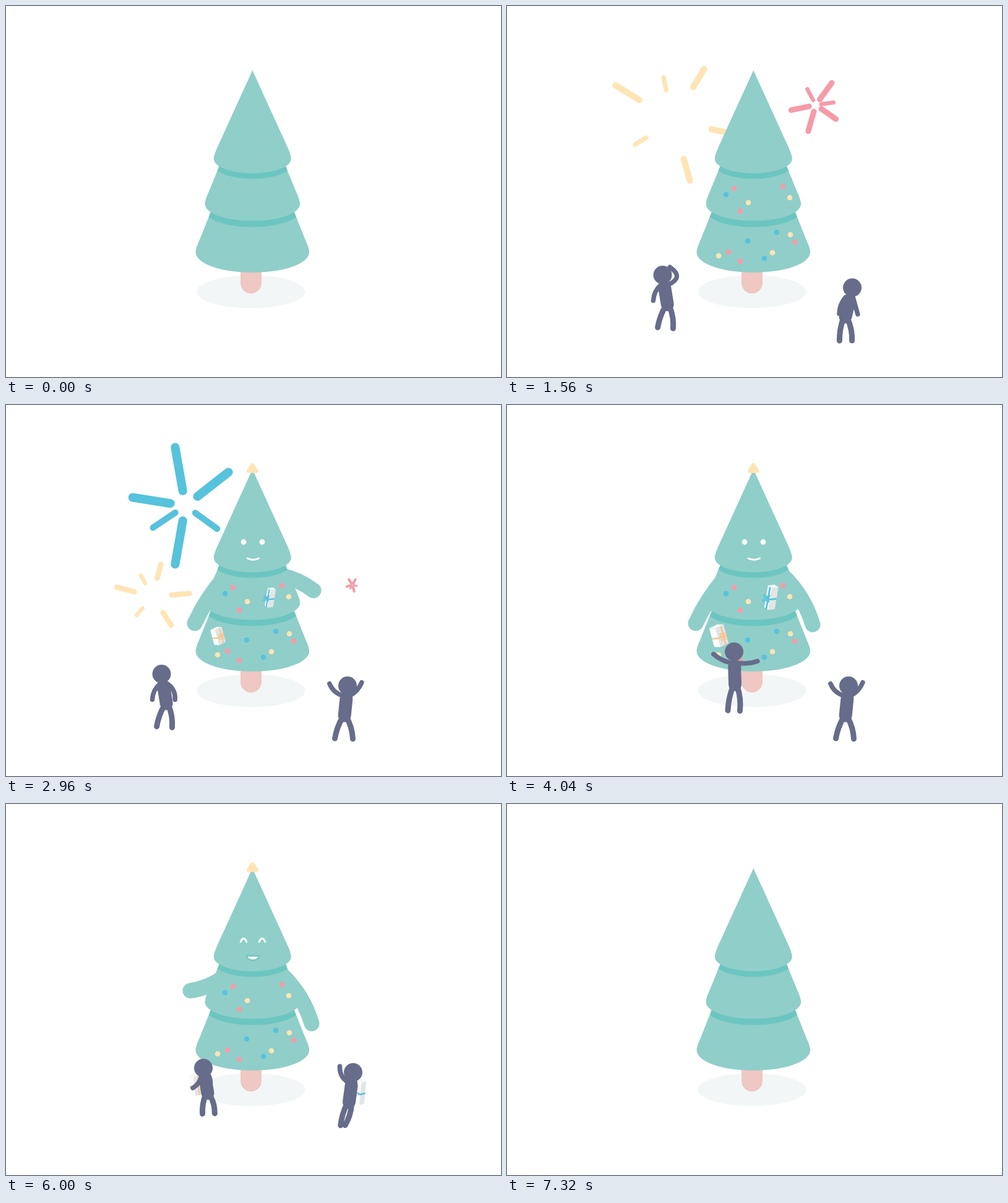
Recreate the animation shown at these times as an HTML page with a canvas. Size 800 by 600 pixels, loop 8.52 s.

```html
<!DOCTYPE html>
<html lang="en">
<head>
<meta charset="utf-8">
<title>Festive tree</title>
<style>
html, body { margin: 0; width: 100%; height: 100%; overflow: hidden; background: #fff; }
canvas { display: block; width: 800px; height: 600px; }
</style>
</head>
<body>
<canvas id="stage" width="800" height="600"></canvas>
<script>
const c = document.getElementById('stage').getContext('2d');
const LOOP = 8520, STEP = 40, CX = 398.3;
const LEAF = '#90cec9', BAND = '#6cc5c0', BODY = '#666c8a';
const PINK = '#f59ba8', YELLOW = '#ffe4b5', BLUE = '#57c2dc', ORANGE = '#f3c794';

const clamp = v => Math.max(0, Math.min(1, v));
const span = (t, a, b) => clamp((t - a) / (b - a));
const smooth = p => p * p * (3 - 2 * p);
const ease = (t, a, b) => smooth(span(t, a, b));
const outCubic = p => 1 - (1 - p) ** 3;
const lerp = (a, b, p) => a + (b - a) * p;
const mix = (a, b, p) => a.map((v, i) => lerp(v, b[i], p));
const swell = p => p <= 0 ? 0 : 1 + 2.2 * (p - 1) ** 3 + 1.2 * (p - 1) ** 2;
const shown = (t, inAt, outAt) => swell(span(t, inAt, inAt + 260)) * (1 - ease(t, outAt, outAt + 260));

function disc(x, y, r, color) {
  c.fillStyle = color;
  c.beginPath();
  c.arc(x, y, Math.max(0, r), 0, 7);
  c.fill();
}

// A stroke between two points, bowed sideways by `bend`.
function bow(color, width, x1, y1, x2, y2, bend = 0) {
  const dx = x2 - x1, dy = y2 - y1, k = bend / (Math.hypot(dx, dy) || 1);
  c.strokeStyle = color;
  c.lineWidth = width;
  c.beginPath();
  c.moveTo(x1, y1);
  c.quadraticCurveTo((x1 + x2) / 2 + dy * k, (y1 + y2) / 2 - dx * k, x2, y2);
  c.stroke();
}

function shape(color, ...pts) {
  c.fillStyle = color;
  c.beginPath();
  pts.forEach(([x, y]) => c.lineTo(x, y));
  c.closePath();
  c.fill();
}

function at(x, y, scale, paint) {
  if (scale <= 0) return;
  c.save();
  c.translate(x, y);
  c.scale(scale, scale);
  paint();
  c.restore();
}

// ---- fireworks ----
const RAYS = [[0, 1], [46, .66], [89, .9], [160, 1], [222, .92], [296, .66]];
const LIFE = 576;
const BURSTS = [
  { start: 1186, x: 268, y: 186, size: 114, turn: -148, color: YELLOW },
  { start: 1480, x: 499, y: 160, size: 122, turn: -54, color: PINK },
  { start: 2620, x: 237, y: 310, size: 64, turn: -165, color: YELLOW },
  { start: 2758, x: 290, y: 163, size: 132, turn: 100, color: BLUE },
  { start: 2914, x: 560, y: 291, size: 48, turn: 76, color: PINK }
];

function burst(t, { start, x, y, size, turn, color }) {
  const p = (t - start) / LIFE;
  if (p <= 0 || p >= 1) return;
  const out = outCubic(p);
  const inner = Math.max(.25 * out, p ** 2.15 * (2.2 - 1.2 * p));
  const width = (6 + size * .063) * Math.sin(Math.PI * p ** .75);
  for (const [deg, len] of RAYS) {
    const a = (deg + turn) * Math.PI / 180, thin = len < .8;
    const r1 = size * inner * (thin ? .8 : 1), r2 = size * out * len;
    const dx = Math.cos(a), dy = Math.sin(a);
    bow(color, width * (thin ? .72 : 1), x + dx * r1, y + dy * r1, x + dx * r2, y + dy * r2);
  }
}

// ---- tree ----
function tier(topHalf, topY, half, y, base) {
  const p = new Path2D(), k = lerp(y, base, .57);
  p.moveTo(CX - topHalf, topY);
  p.lineTo(CX - half + 6, y - 19);
  p.quadraticCurveTo(CX - half, y - 6, CX - half, y);
  p.bezierCurveTo(CX - half, k, CX - half * .55, base, CX, base);
  p.bezierCurveTo(CX + half * .55, base, CX + half, k, CX + half, y);
  p.quadraticCurveTo(CX + half, y - 6, CX + half - 6, y - 19);
  p.lineTo(CX + topHalf, topY);
  p.closePath();
  return p;
}
const TOP = tier(0, 104, 62.5, 247, 270.5);
const MIDDLE = tier(52, 255, 76.8, 320, 347.5);
const BOTTOM = tier(67, 332, 91.8, 398, 431);

function layer(path, above, drop) {
  c.fillStyle = LEAF;
  c.fill(path);
  if (!above) return;
  c.save();
  c.clip(path);
  c.translate(0, drop);
  c.fillStyle = BAND;
  c.fill(above);
  c.restore();
}

function arms(t) {
  if (t < 2100 || t > 7040) return;
  const out = ease(t, 2100, 2520) * (1 - ease(t, 6700, 7040));
  const wave = (a, b) => t > a && t < b ? (1 - Math.cos((t - a) * Math.PI / 200)) / 2 : 0;

  const lift = ease(t, 5320, 5600), drop = ease(t, 3760, 4000);
  let left = mix([305, 353], [298, 302], lift);
  left = mix(left, [284, 249], wave(5600, 6800));
  bow(LEAF, 25, 352, 280, ...mix([352, 285], left, out), lerp(-6, 7, lift) * out);

  let right = mix([497, 300], [513, 282], wave(2560, 3760));
  right = mix(right, [494, 355], drop);
  bow(LEAF, 25, 446, 276, ...mix([446, 285], right, out), lerp(6, 12, drop) * out);
}

const DOTS = {
  [PINK]: [[367, 295], [446, 292], [377, 332], [358, 398], [465, 382], [377, 413]],
  [BLUE]: [[354, 305], [389, 380], [436, 366], [416, 408]],
  [YELLOW]: [[390, 318], [457, 310], [458, 370], [429, 399], [342, 404]]
};

function dots(t) {
  let n = 0;
  for (const color in DOTS) {
    for (const [x, y] of DOTS[color]) {
      disc(x, y, 4.3 * shown(t, 960 + n++ * 7 % 15 * 22, 7060), color);
    }
  }
}

function star() {
  c.strokeStyle = YELLOW;
  c.lineWidth = 6;
  shape(YELLOW, [0, -13], [6.5, -3], [-6.5, -3]);
  c.stroke();
}

function face(happy) {
  for (const x of [-15, 15]) {
    if (happy) bow('#fff', 2.8, x - 5, -13, x + 5, -13, 11);
    else disc(x, -14.5, 4.4, '#fff');
  }
  if (!happy) return bow('#fff', 3, -9, 12, 9.5, 12, -4.5);
  c.fillStyle = '#fff';
  c.strokeStyle = BAND;
  c.lineWidth = 2.4;
  c.beginPath();
  c.moveTo(-10.5, 9.5);
  c.lineTo(10.5, 9.5);
  c.bezierCurveTo(8, 19, -8, 19, -10.5, 9.5);
  c.closePath();
  c.fill();
  c.stroke();
}

function tree(t) {
  c.fillStyle = '#f2f6f7';
  c.beginPath();
  c.ellipse(396, 462, 87.5, 26.5, 0, 0, 7);
  c.fill();
  bow('#efc7c3', 34, 396, 420, 396, 448);
  arms(t);
  layer(BOTTOM, MIDDLE, 10);
  layer(MIDDLE, TOP, 9);
  layer(TOP);
  dots(t);
  at(CX, 110, shown(t, 1880, 6980), star);
  at(399, 236, shown(t, 2040, 6840), () => face(t >= 4400));
}

// ---- people ----
// head x, y, size, lean, then angle and bend of each arm, angle of each leg (0 hangs down)
const POSES = {
  stand: [251.5, 435, 1, .16, -.45, -6, .45, 8, -.34, .15],
  scratch: [251.5, 435, 1, .16, -.45, -6, 3.06, -25, -.34, .15],
  reach: [367, 399, 1.1, .03, -2.04, 4, 1.66, -4, -.2, .1],
  bend: [401, 436, .8, -.8, .5, -4, .92, 6, 0, -.25],
  carry: [319, 427, .85, .17, -.62, 5, 0, 5, -.15, .25],
  shrug: [558, 455.5, 1, -.23, -.37, -5, .27, 0, -.16, .19],
  cheer: [552, 454, 1, -.1, -2.31, 7, 2.41, -5, -.34, .27],
  look: [509, 450, 1, -.06, -.87, 5, -.1, 14, -.4, .2],
  wave: [561, 434, 1, -.135, -2.68, 8, -.15, 0, -.28, -.3]
};
// time, pose, sideways shift, strides taken to get there
const LEFT = [
  [240, 'stand', -142], [1260, 'stand', 0, 3], [1520, 'scratch'], [1800, 'scratch'], [1960, 'stand'],
  [3340, 'stand'], [4030, 'reach', 0, 2], [4400, 'reach'], [4880, 'bend'], [5040, 'bend'],
  [5300, 'carry', 56], [6000, 'carry', 0, 2], [7040, 'carry', -207, 4]
];
const RIGHT = [
  [520, 'shrug', 132], [1480, 'shrug', 0, 3], [1800, 'shrug'], [1960, 'cheer'], [4440, 'cheer'],
  [4920, 'look', 0, 2], [5300, 'look', -44, 2], [5420, 'look', -44], [6000, 'wave', 0, 2],
  [6760, 'wave', 132, 3]
];

function poseAt(t, keys) {
  const i = keys.findIndex(k => k[0] > t);
  if (i < 1) return null;
  const place = ([, name, dx = 0]) => {
    const [x, y, ...rest] = POSES[name];
    return [x + dx, y + Math.abs(dx) * .17, ...rest];
  };
  const a = keys[i - 1], b = keys[i], strides = b[3] || 0;
  const p = span(t, a[0], b[0]);
  const pose = mix(place(a), place(b), strides ? p : smooth(p));
  const swing = Math.sin(2 * Math.PI * strides * p);
  pose[4] -= .12 * swing;
  pose[6] += .12 * swing;
  pose[8] += .35 * swing;
  pose[9] -= .35 * swing;
  return pose;
}

function person(pose) {
  if (!pose) return;
  const [x, y, size, lean, armL, bendL, armR, bendR, legL, legR] = pose;
  const along = (x, y, a, len) => [x + Math.sin(a) * len * size, y + Math.cos(a) * len * size];
  const limb = (x, y, a, len, bend, w) => bow(BODY, w, x, y, ...along(x, y, a, len), bend);
  const [nx, ny] = along(x, y, lean, 21), [hx, hy] = along(x, y, lean, 48.5);
  disc(x, y, 15, BODY);
  bow(BODY, 21, nx, ny, hx, hy);
  limb(nx - 6, ny - 5, armL, 28.5, bendL, 7.5);
  limb(nx + 6, ny - 5, armR, 28.5, bendR, 7.5);
  limb(hx - 4, hy + 4, legL, 35, -3, 9);
  limb(hx + 4, hy + 4, legR, 35, 4, 9);
}

// ---- presents ----
const GIFTS = [
  { color: ORANGE, wl: 10, wr: 14, h: 31, knot: 7, hang: [343, 375], tilt: -.26, floor: [356, 480], hold: [-13, 29], lift: 5040 },
  { color: BLUE, wl: 7, wr: 10, h: 36, knot: -8, hang: [427, 313], tilt: .17, floor: [440, 486], hold: [13, 34], lift: 5240 }
];

function gift(t, { color, wl, wr, h, knot, hang, tilt, floor, hold, lift }, owner) {
  if (t < 2720 || !owner) return;
  const fall = span(t, 4240, 4560) ** 2, held = ease(t, lift, lift + 200);
  const [x, y] = mix(mix(hang, floor, fall), [owner[0] + hold[0], owner[1] + hold[1]], held);
  at(x, y, outCubic(span(t, 2720, 3300)), () => {
    c.rotate(tilt * (1 - fall) + .09 * held * Math.sign(tilt));
    c.scale(1 - .25 * held, 1);
    c.lineCap = 'butt';
    const m = (wl - wr) / 2, l = m - wl, r = m + wr, top = -h / 2, low = h / 2;
    shape('#fbfbfb', [l, top - 2], [m, top + 1], [m, low + 1], [l, low - 2]);
    shape('#e2e5e6', [m, top + 1], [r, top - 2], [r, low - 2], [m, low + 1]);
    shape('#f6f6f6', [l, top - 2], [m, top + 1], [r, top - 2], [r - wl, top - 5]);
    bow(color, 2.8, l, 0, m, 2);
    bow(color, 2.8, m, 2, r, -1);
    const v = knot > 0 ? knot : m - wl / 2;
    if (held < .6 || knot > 0) bow(color, 2.8, v, top, v, low);
    if (held > .6) return;
    c.lineWidth = 1.6;
    for (const side of [-1, 1]) for (const end of [-1, 1]) {
      c.beginPath();
      c.ellipse(knot + 2.5 * side, 1 + 3 * end, 3.4, 1.6, .8 * side * end, 0, 7);
      c.stroke();
    }
  });
}

// ---- scene ----
function draw(t) {
  c.fillStyle = '#fff';
  c.fillRect(0, 0, 800, 600);
  c.lineCap = c.lineJoin = 'round';
  BURSTS.forEach(b => burst(t, b));
  tree(t);
  const people = [poseAt(t, LEFT), poseAt(t, RIGHT)];
  c.save();
  c.beginPath();
  c.rect(135, 0, 529, 600);
  c.clip();
  GIFTS.forEach((g, i) => gift(t, g, people[i]));
  people.forEach(person);
  c.restore();
}

function tick() {
  draw(Math.floor(performance.now() % LOOP / STEP) * STEP);
  requestAnimationFrame(tick);
}
tick();
</script>
</body>
</html>
```
